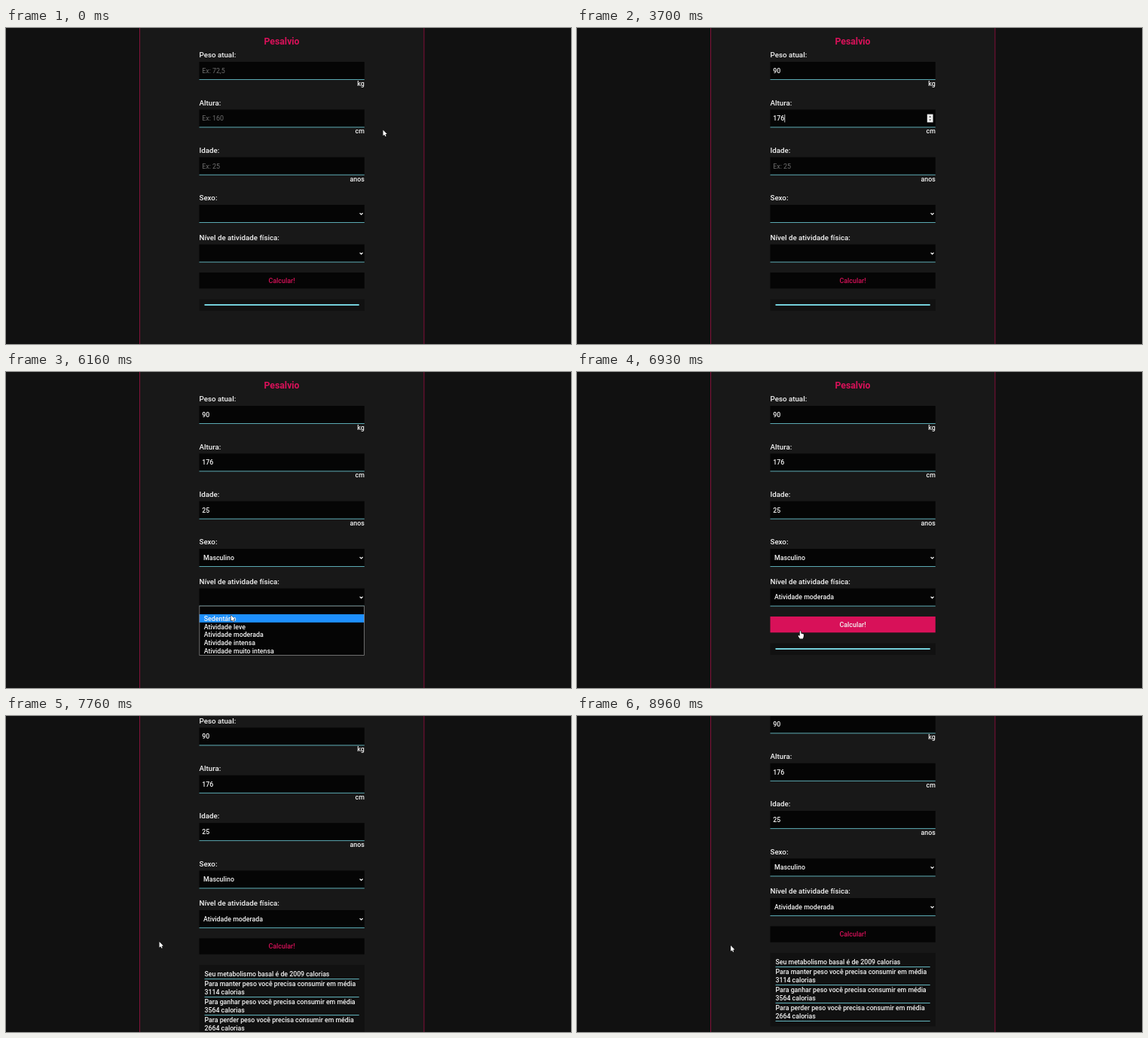
Recreate the animation shown at these times as an HTML page with a canvas. Size 750 by 420 pixels, loop 9000 ms.

```html
<!DOCTYPE html>
<html lang="pt">
<head>
<meta charset="utf-8">
<title>Pesalvio</title>
<style>
html, body { margin: 0; width: 100%; height: 100%; overflow: hidden; background: #111; }
canvas { display: block; }
</style>
</head>
<body>
<canvas id="stage" width="750" height="420"></canvas>
<script>
const ctx = document.getElementById('stage').getContext('2d');
const LOOP = 9000;
const PINK = '#d81159', TEAL = '#6cc8d2', WHITE = '#f4f4f4', BLACK = '#050505';
const LEFT = 256.5, WIDTH = 219.3, RIGHT = LEFT + WIDTH, MID = 366;
const ROW = 10.9;
const CALC = 7190;

const fields = [
  { y: 45, label: 'Peso atual:', unit: 'kg', hint: 'Ex: 72,5', text: '90', keys: [1230, 1400], focus: [1060, 2100] },
  { y: 108.4, label: 'Altura:', unit: 'cm', hint: 'Ex: 160', text: '176', keys: [2960, 3100, 3400], focus: [2100, 4220] },
  { y: 171.7, label: 'Idade:', unit: 'anos', hint: 'Ex: 25', text: '25', keys: [4400, 4560], focus: [4220, 4960] }
];
const selects = [
  { y: 235, label: 'Sexo:', open: 4960, pick: 5430, choice: 1, options: ['', 'Masculino', 'Feminino'] },
  { y: 287.6, label: 'Nível de atividade física:', open: 5900, pick: 6640, choice: 3,
    options: ['', 'Sedentário', 'Atividade leve', 'Atividade moderada', 'Atividade intensa', 'Atividade muito intensa'] }
];
const results = [
  ['Seu metabolismo basal é de 2009 calorias'],
  ['Para manter peso você precisa consumir em média', '3114 calorias'],
  ['Para ganhar peso você precisa consumir em média', '3564 calorias'],
  ['Para perder peso você precisa consumir em média', '2664 calorias']
];
// Pointer stops: time, x, y
const path = [
  [0, 500.5, 135.5], [60, 500.5, 135.5], [820, 335, 57], [1740, 335, 57],
  [2080, 307, 119], [2300, 307, 119], [2700, 365, 118], [3780, 365, 118],
  [4170, 345, 183], [4620, 345, 183], [4900, 325, 247], [4980, 325, 247],
  [5270, 311.5, 273.5], [5480, 311.5, 273.5], [5820, 300, 299], [5930, 300, 299],
  [6400, 297, 349], [6680, 297, 349], [6860, 296.5, 344.3], [7220, 296.5, 344.3],
  [7620, 203.5, 300], [8150, 203.5, 300], [8450, 197, 308], [8800, 204, 305], [9000, 204, 305]
];

const ease = p => p * p * (3 - 2 * p);
const ramp = (t, a, b) => ease(Math.min(1, Math.max(0, (t - a) / (b - a))));
const within = (t, a, b) => t >= a && t < b;

function pointerAt(t) {
  const i = path.findIndex(p => p[0] > t);
  const [t0, x0, y0] = path[i - 1], [t1, x1, y1] = path[i];
  const k = ramp(t, t0, t1);
  return { x: x0 + (x1 - x0) * k, y: y0 + (y1 - y0) * k };
}

function rect(x, y, w, h, color) {
  ctx.fillStyle = color;
  ctx.fillRect(x, y, w, h);
}

function write(text, x, y, { size = 8.8, weight = 500, color = WHITE, align = 'left' } = {}) {
  ctx.font = `${weight} ${size}px Roboto, Inter, sans-serif`;
  ctx.textAlign = align;
  ctx.fillStyle = color;
  ctx.fillText(text, x, y);
}

function poly(points, fill, stroke) {
  ctx.beginPath();
  points.forEach(([x, y]) => ctx.lineTo(x, y));
  ctx.closePath();
  if (stroke) {
    ctx.lineWidth = 1;
    ctx.strokeStyle = stroke;
    ctx.stroke();
  }
  ctx.fillStyle = fill;
  ctx.fill();
}

function drawBox(y, label) {
  write(label, LEFT, y - 5.8, { size: 9.75 });
  rect(LEFT, y, WIDTH, 23, BLACK);
  rect(LEFT, y + 23, WIDTH, 1, '#5aa9b2');
}

function drawSpinner(y) {
  rect(464.8, y + 6.2, 7.8, 10.8, '#efefef');
  poly([[467.2, y + 10.3], [468.7, y + 8.4], [470.2, y + 10.3]], '#444');
  poly([[467.2, y + 13], [468.7, y + 14.9], [470.2, y + 13]], '#444');
}

function drawField(f, t, hovered) {
  drawBox(f.y, f.label);
  write(f.unit, RIGHT, f.y + 32, { align: 'right' });
  const typed = f.text.slice(0, f.keys.filter(k => k <= t).length);
  const base = f.y + 15;
  if (typed) write(typed, 260.2, base);
  else write(f.hint, 260.2, base, { color: '#707070', weight: 400, size: 8.9 });
  const focused = within(t, ...f.focus);
  if (focused) {
    const last = Math.max(f.focus[0], ...f.keys.filter(k => k <= t));
    const end = typed ? ctx.measureText(typed).width : 0;
    if ((t - last) % 1000 < 500) rect(260.4 + end, f.y + 6.5, 0.8, 10.5, WHITE);
  }
  if (focused || hovered) drawSpinner(f.y);
}

function drawSelect(s, t) {
  drawBox(s.y, s.label);
  if (t >= s.pick) write(s.options[s.choice], 262, s.y + 14.8);
  ctx.beginPath();
  ctx.moveTo(469.6, s.y + 11);
  ctx.lineTo(471.6, s.y + 12.9);
  ctx.lineTo(473.6, s.y + 11);
  ctx.lineWidth = 1.3;
  ctx.strokeStyle = WHITE;
  ctx.stroke();
}

function drawMenu(s, pointerY) {
  const top = s.y + 23.5, n = s.options.length;
  const active = Math.min(n - 1, Math.max(0, Math.floor((pointerY - top) / ROW)));
  rect(LEFT, top, WIDTH, n * ROW, BLACK);
  rect(LEFT, top + active * ROW, WIDTH, ROW, '#1e90ff');
  s.options.forEach((o, i) => write(o, 262.8, top + i * ROW + 8.6));
  ctx.lineWidth = 0.8;
  ctx.strokeStyle = '#858585';
  ctx.strokeRect(LEFT + 0.3, top, WIDTH - 0.6, n * ROW);
}

function drawButton(hot) {
  rect(LEFT, 325, WIDTH, 21.3, hot ? PINK : BLACK);
  write('Calcular!', MID, 338.8, { align: 'center', color: hot ? WHITE : PINK, size: 8.9 });
}

function drawResults(t) {
  if (t < CALC) {
    rect(LEFT, 360.5, WIDTH, 15.5, '#111');
    rect(263.5, 367, 205.2, 2, '#74d0db');
    return;
  }
  rect(LEFT, 360.5, WIDTH, 97.5, '#111');
  let y = 367;
  for (const lines of results) {
    for (const line of lines) {
      write(line, 263.5, y + 8.9, { size: 8.75 });
      y += 11.7;
    }
    rect(263.5, y, 205.2, 0.9, TEAL);
    y += 0.6;
  }
}

function drawArrow(x, y) {
  poly([[0, 0], [0, 7.8], [1.8, 6.2], [3, 8.8], [4.2, 8.2], [3.1, 5.8], [5.4, 5.6]]
    .map(([a, b]) => [x + a, y + b]), '#fff', '#000');
}

function drawHand(x, y) {
  poly([[-0.7, 0], [0.7, 0], [0.9, 3.2], [4, 4], [4.5, 5], [4.2, 8], [3.3, 10.2],
    [-0.6, 10.2], [-3, 6.6], [-2.4, 5.5], [-0.8, 6.6]]
    .map(([a, b]) => [x + a, y + b]), '#fff', '#000');
}

function draw(t) {
  const p = pointerAt(t);
  const scroll = 45.6 * ramp(t, 7610, 7860);
  const py = p.y + scroll;
  const menu = selects.find(s => within(t, s.open, s.pick));
  const inside = (y, h) => !menu && p.x > LEFT && p.x < RIGHT && py > y && py < y + h;
  const hot = inside(325, 21.3);

  rect(0, 0, 750, 420, '#111');
  rect(178, 0, 376.5, 420, '#181818');
  rect(177, 0, 1, 420, '#82123a');
  rect(554.4, 0, 1, 420, '#82123a');

  ctx.save();
  ctx.translate(0, -scroll);
  write('Pesalvio', MID, 22.3, { size: 12.3, weight: 700, color: PINK, align: 'center' });
  fields.forEach(f => drawField(f, t, inside(f.y, 24)));
  selects.forEach(s => drawSelect(s, t));
  drawButton(hot);
  drawResults(t);
  if (menu) drawMenu(menu, py);
  ctx.restore();

  // The dark text cursor cannot be seen over the inputs
  if (hot) drawHand(p.x, p.y);
  else if (!fields.some(f => inside(f.y, 24))) drawArrow(p.x, p.y);
}

let start;
function tick(now) {
  start ??= now;
  draw((now - start) % LOOP);
  requestAnimationFrame(tick);
}
draw(0);
requestAnimationFrame(tick);
</script>
</body>
</html>
```
